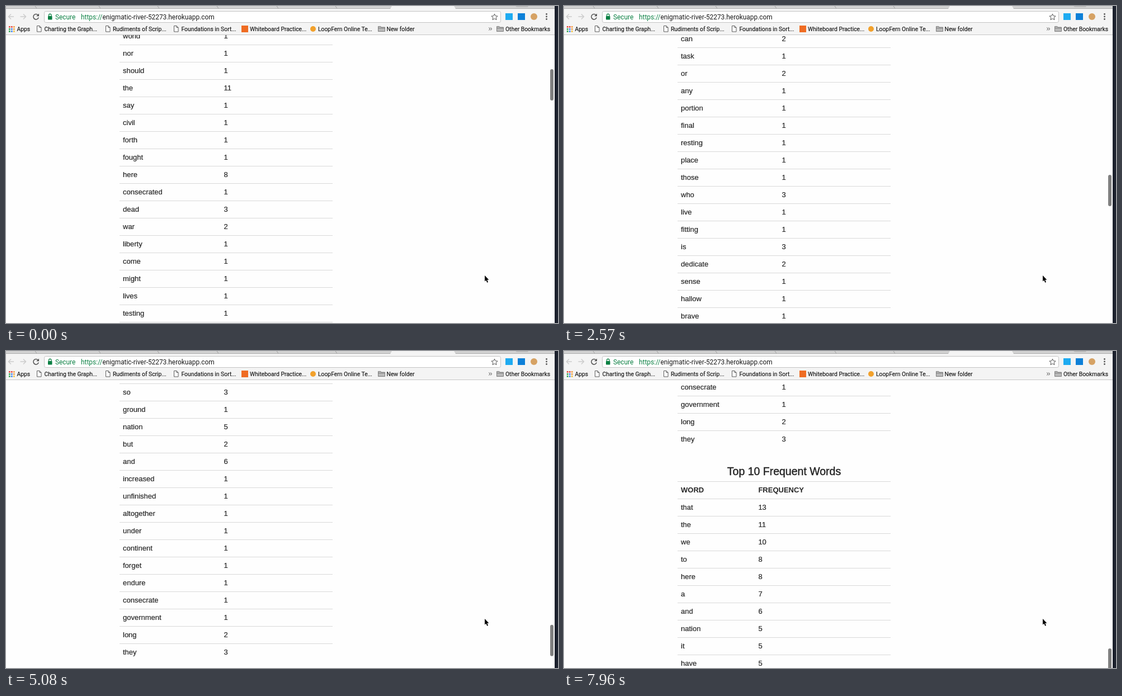
Write an HTML page that moves like this. It is 987 px wide and 567 px high and loops after 8 s.

```html
<!DOCTYPE html>
<html lang="en">
<head>
<meta charset="utf-8">
<title>Word frequencies</title>
<style>
  html, body { margin: 0; width: 100%; height: 100%; overflow: hidden; }
  body { position: relative; background: #fefefe; }
  #page { position: absolute; left: 0; top: 52px; width: 981px; height: 515px; overflow: hidden; background: #fefefe; }
  #content {
    position: absolute; left: 203px; top: -14px; width: 381px;
    font: 13px/30px "Liberation Sans", Arial, sans-serif; color: #262626; -webkit-text-stroke: .2px #262626;
  }
  .row { position: relative; height: 30px; border-top: 1px solid #d9d9d9; padding-left: 6px; white-space: nowrap; }
  .row b, .row span { position: absolute; top: 0; }
  .row b { -webkit-text-stroke: 0; }
  .all span { left: 186.4px; }
  .top span, .top b + b { left: 144.4px; }
  h2 {
    position: absolute; top: 3933px; left: 0; width: 381px; margin: 0; text-align: center;
    font-size: 19.5px; font-weight: 400; line-height: 30px; -webkit-text-stroke: .45px #262626;
  }
  .top { position: absolute; top: 3966px; left: 0; width: 381px; }
  #thumb { position: absolute; left: 972.5px; top: 61px; width: 6px; height: 56px; border-radius: 3px; background: #7f7f7f; }
  svg { position: absolute; left: 0; top: 0; }
  svg text { font-family: Roboto, "Open Sans", sans-serif; white-space: pre; }
  .url { font-size: 11.85px; }
  .mark { font-size: 10.35px; fill: #141414; stroke: #141414; stroke-width: .15px; }
</style>
</head>
<body>
<div id="page">
  <div id="content">
    <div class="all" id="all"></div>
    <h2>Top 10 Frequent Words</h2>
    <div class="top" id="top"><div class="row"><b>WORD</b><b>FREQUENCY</b></div></div>
  </div>
  <div id="thumb"></div>
</div>

<svg width="987" height="567" viewBox="0 0 987 567">
  <defs>
    <g id="doc" fill="#fff" stroke="#5c5c5c">
      <path d="M.5.5h4.500l3 3v7.500h-7.500zM5 .5v3h3"/>
    </g>
    <g id="folder" fill="#b9b9b9" stroke="#777" stroke-width=".9">
      <path d="M.5 9.500v-9h4.500l1 1.500h6.500v7.500z"/><path d="M.5 3.500h12" fill="none"/>
    </g>
  </defs>

  <!-- tab strip and toolbar -->
  <rect width="981" height="52" fill="#f4f4f4"/>
  <rect width="981" height="4" fill="#d2d2d2"/>
  <path d="M0 4.500H688M803 4.500H981" stroke="#ababab"/>
  <path d="M687 5l3-5h111l3 5z" fill="#f4f4f4"/>
  <path id="seams" fill="none" stroke="#a2a2a2"/>
  <path d="M911 0l2 2h20l1-2z" fill="#bcbcbc"/>
  <path d="M0 51.500H981" stroke="#c6c6c6"/>
  <rect x="981" width="6" height="567" fill="#1c212d"/>

  <g fill="none" stroke-width="1.500">
    <path d="M14 19H4.500M9 14.500L4.500 19L9 23.500M25.500 19H35.500M31 14.500L35.500 19L31 23.500" stroke="#cdcdcd"/>
    <path d="M57.300 16.300A4.700 4.700 0 1 0 58.200 20.500" stroke="#555"/>
  </g>
  <path d="M59 13.500v4.800h-4.800z" fill="#555"/>

  <rect x="68.500" y="9.500" width="816" height="20" rx="3" fill="#fff" stroke="#c3c3c3"/>
  <rect x="75" y="18" width="7.500" height="6.500" rx=".8" fill="#0b8043"/>
  <path d="M76.600 18v-1.800a2.150 2.150 0 0 1 4.300 0V18" fill="none" stroke="#0b8043" stroke-width="1.300"/>
  <text class="url" x="88" y="23.500" fill="#0b8043">Secure</text>
  <text class="url" x="134" y="23.500" fill="#1a1a1a"><tspan fill="#0b8043">https://</tspan>enigmatic-river-52273.herokuapp.com</text>
  <path d="M873.500 14l1.600 3.700 4 .4-3 2.700.9 3.900-3.500-2.100-3.500 2.100.9-3.900-3-2.700 4-.4z" fill="none" stroke="#555"/>

  <rect x="893" y="13" width="13" height="12" fill="#1eabf1"/>
  <rect x="915" y="13" width="13" height="12" fill="#0d80d8"/>
  <circle cx="944" cy="19" r="6" fill="#d6a264"/>
  <g fill="#555"><circle cx="966.500" cy="14.500" r="1.400"/><circle cx="966.500" cy="19" r="1.400"/><circle cx="966.500" cy="23.500" r="1.400"/></g>

  <!-- bookmarks -->
  <g id="apps"></g>
  <use href="#doc" x="55" y="35"/>
  <use href="#doc" x="178" y="35"/>
  <use href="#doc" x="300" y="35"/>
  <rect x="421" y="35" width="12" height="12" fill="#ef6c23"/>
  <circle cx="549" cy="41" r="5" fill="#f2a12c"/>
  <use href="#folder" x="665" y="36"/>
  <use href="#folder" x="877" y="36"/>
  <g class="mark">
    <text x="19.500" y="45">Apps</text>
    <text x="68.500" y="45">Charting the Graph...</text>
    <text x="191" y="45">Rudiments of Scrip...</text>
    <text x="313.500" y="45">Foundations in Sort...</text>
    <text x="436" y="45">Whiteboard Practice...</text>
    <text x="558" y="45">LoopFern Online Te...</text>
    <text x="680.500" y="45">New folder</text>
    <text x="893" y="45">Other Bookmarks</text>
  </g>
  <path d="M863.500 38.500l2 2.500-2 2.500M866.500 38.500l2 2.500-2 2.500" fill="none" stroke="#444"/>

  <path id="cursor" d="M0 0V10.600L2.400 8.400L4.200 12.700L6 11.900L4.200 7.700H7.400Z" stroke="#fff" stroke-width="1" paint-order="stroke"/>
</svg>

<script>
  const $ = id => document.getElementById(id);

  // A word without a number occurs once.
  const words = `world,nor,should,the 11,say,civil,forth,fought,here 8,consecrated,dead 3,war 2,liberty,come,
might,lives,testing,gave 2,as,years,battlefield,for 5,advanced,to 8,are 3,remaining,our 2,freedom,
seven,fathers,brought,on 2,this 4,new 2,conceived 2,proposition,men 2,created,equal,whether,
met,dedicated 4,remember,rather 2,devotion 2,now,never,proper,we 10,do,field,measure,birth,great 3,cannot 3,can 2,task,
or 2,any,portion,final,resting,place,those,who 3,live,fitting,is 3,dedicate 2,sense,hallow,brave,struggled,far 2,poor,
earth,add,above,from 2,all,fourscore,larger,which 2,us 3,engaged,living 2,their,work,will,perish,ago,in 4,
power,detract,little,note,what 2,did,be 2,thus,nobly,before,these 3,honored,take,cause,last,full,highly,resolve,
so 3,ground,nation 5,but 2,and 6,increased,unfinished,altogether,under,continent,forget,endure,consecrate,government,long 2,they 3`;
  const common = "that 13,the 11,we 10,to 8,here 8,a 7,and 6,nation 5,it 5,have 5";

  const rows = list => list.split(",").map(item => {
    const [word, count = 1] = item.trim().split(" ");
    return `<div class="row">${word}<span>${count}</span></div>`;
  }).join("");
  $("all").innerHTML = rows(words);
  $("top").innerHTML += rows(common);

  $("seams").setAttribute("d", [54, 168, 273, 379, 486, 591].map(x => `M${x - 2} 0l3 4.5`).join(""));
  const dots = ["#e8453c", "#e8453c", "#f4a142", "#34a853", "#4285f4", "#f4a142", "#34a853", "#4285f4", "#f4c142"];
  $("apps").innerHTML = dots.map((c, i) =>
    `<rect x="${5 + i % 3 * 4}" y="${36 + (i / 3 | 0) * 4}" width="2.700" height="2.700" fill="${c}"/>`).join("");

  // Scroll curve: [ms, px], sampled at the repaint times below.
  const LOOP = 8000;
  const keys = [[0, 0], [780, 333], [1970, 1223], [3360, 2306], [5080, 3390], [5880, 3776], [6530, 3774], [7960, 3771]];
  const paints = [0, 150, 360, 570, 780, 990, 1170, 1340, 1550, 1760, 1970, 2150, 2360, 2570, 2770, 2970, 3160, 3360,
    3540, 3720, 3900, 4090, 4280, 4470, 4660, 4870, 5080, 5290, 5500, 5690, 5880, 6210, 6370, 6530, 6680, 6840, 7010,
    7480, 7780, 7960];

  const secant = i => (keys[i + 1][1] - keys[i][1]) / (keys[i + 1][0] - keys[i][0]);
  const slope = i => {
    if (i === 0) return secant(0) * .8;
    if (i === keys.length - 1) return 0;
    const a = secant(i - 1), b = secant(i);
    return a * b > 0 ? 2 * a * b / (a + b) : 0;
  };

  function scrollAt(t) {
    let i = 0;
    while (i < keys.length - 2 && t >= keys[i + 1][0]) i++;
    const [t0, y0] = keys[i], [t1, y1] = keys[i + 1];
    const d = t1 - t0, u = (t - t0) / d, v = 1 - u;
    return y0 * v * v * (1 + 2 * u) + y1 * u * u * (3 - 2 * u) + d * u * v * (slope(i) * v - slope(i + 1) * u);
  }

  function draw(now) {
    const t = now % LOOP;
    const shown = paints.findLast(p => p <= t);
    const y = Math.round(scrollAt(shown));
    $("content").style.transform = `translateY(${-y}px)`;
    $("thumb").style.transform = `translateY(${y / 9}px)`;
    $("cursor").setAttribute("transform", `translate(856 ${shown < 4660 ? 482 : 479})`);
    requestAnimationFrame(draw);
  }
  draw(0);
</script>
</body>
</html>
```
